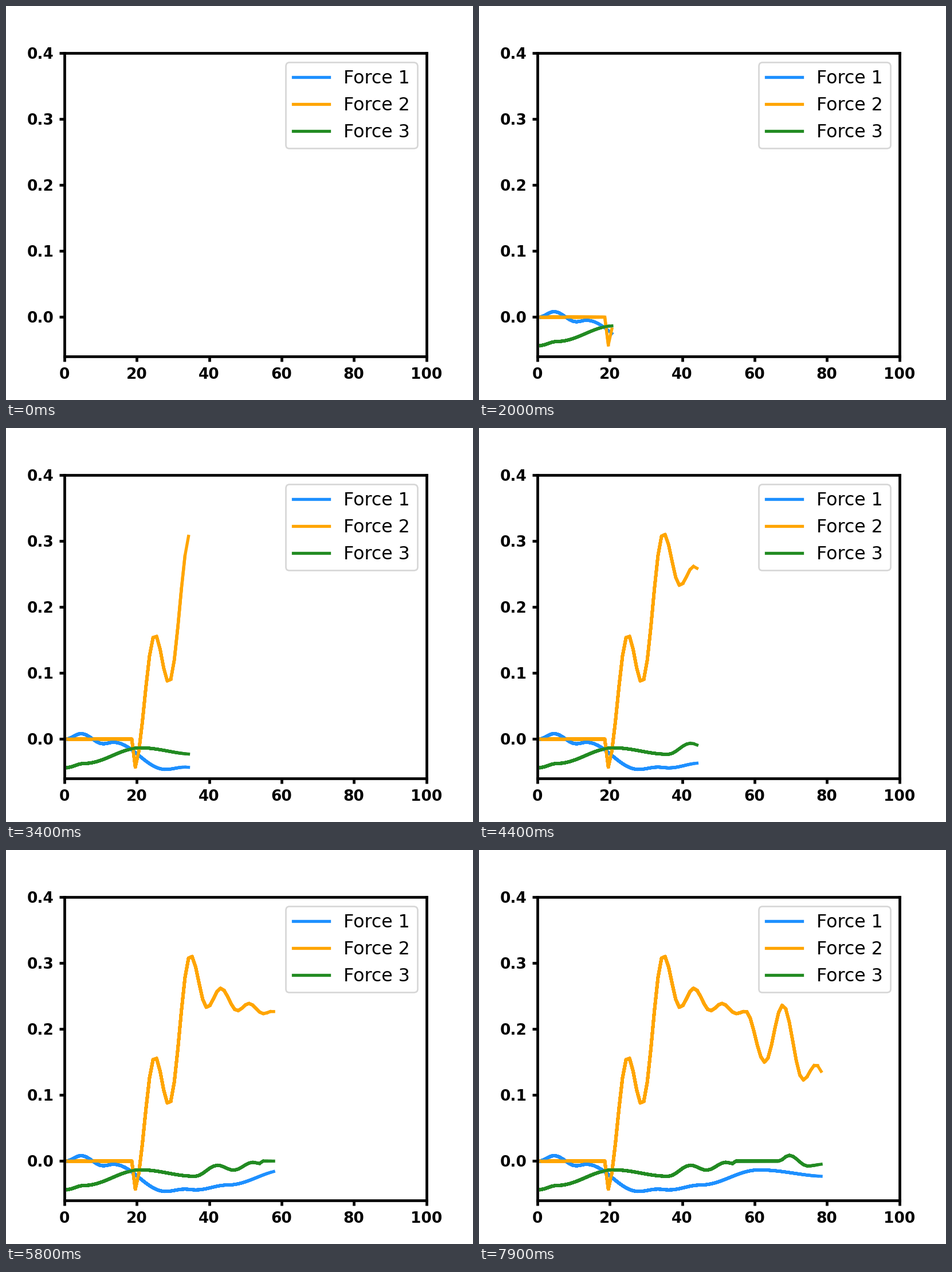
A matplotlib script that plays this animation: 815 by 687 pixels, repeating every 8 s.

```python
import numpy as np
import matplotlib.pyplot as plt
from matplotlib.animation import FuncAnimation

W, H, DPI = 815, 687, 190
FRAMES, STEP_MS = 80, 100
DX = 0.98
FRAME_LW, CURVE_LW = 1.8, 2
COLORS = ("dodgerblue", "orange", "forestgreen")


def swing(t, *turns):
    """Half cosine waves between turning points (t, thousandths)."""
    knots, levels = np.array(turns).T
    i = np.searchsorted(knots, t, side="right") - 1
    u = (t - knots[i]) / (knots[i + 1] - knots[i])
    ease = (1 - np.cos(np.pi * u)) / 2
    return (levels[i] + (levels[i + 1] - levels[i]) * ease) / 1000


t = np.arange(1, FRAMES + 1)
x = DX * t

# a short wobble, a sag, then a slow recovery
force1 = swing(t, (0.5, 0), (4.7, 8.3), (11, -7.2), (13.8, -4.8),
               (28.5, -46), (34, -42.5), (37, -43.7), (46, -36.3),
               (62.5, -13.4), (82, -23.3))

# idle until contact, then ringing
CONTACT = 20
ringing = swing(np.maximum(t, CONTACT),
                (19.6, -44.5), (25.55, 158), (29.45, 86), (35.55, 312),
                (40.2, 233), (44.1, 262), (48.75, 228), (52, 239),
                (56.1, 223.6), (58.7, 227.3), (64.15, 150), (69.2, 236.5),
                (74.95, 123), (78.5, 146), (82.9, 108))
force2 = np.where(t < CONTACT, 0, ringing)

# a slow climb to zero, a rest, then a small wave
force3 = swing(t, (0.5, -43.3), (5.5, -37), (21.5, -13.3), (36.8, -23),
               (43.2, -6.4), (47.7, -13.7), (53.2, -1.8), (55, -3.7),
               (56, 0), (68, 0), (71, 8.7), (76.2, -7.4), (81, -4.5))

fig, ax = plt.subplots(figsize=(W / DPI, H / DPI), dpi=DPI)
ax.set_xlim(0, 100)
ax.set_ylim(-0.06, 0.4)
ax.set_xticks(np.arange(0, 101, 20))
ax.set_yticks(np.arange(5) / 10)
ax.tick_params(width=FRAME_LW, length=3.5, labelsize=10)
for label in ax.get_xticklabels() + ax.get_yticklabels():
    label.set_fontweight("bold")
for spine in ax.spines.values():
    spine.set_linewidth(FRAME_LW)

# Each step lays a longer copy over the earlier ones, which hardens the edges.
layers = [
    [ax.plot(x[:n], y[:n], color=c, lw=CURVE_LW)[0]
     for y, c in zip((force1, force2, force3), COLORS)]
    for n in range(1, FRAMES + 1)
]
ax.legend(layers[0], [f"Force {k}" for k in (1, 2, 3)],
          loc="upper right", fontsize=12)


def update(frame):
    for n, layer in enumerate(layers):
        for line in layer:
            line.set_visible(n <= frame)
    return []


anim = FuncAnimation(fig, update, frames=FRAMES, interval=STEP_MS,
                     repeat=True, repeat_delay=0, blit=False)
plt.show()
```
